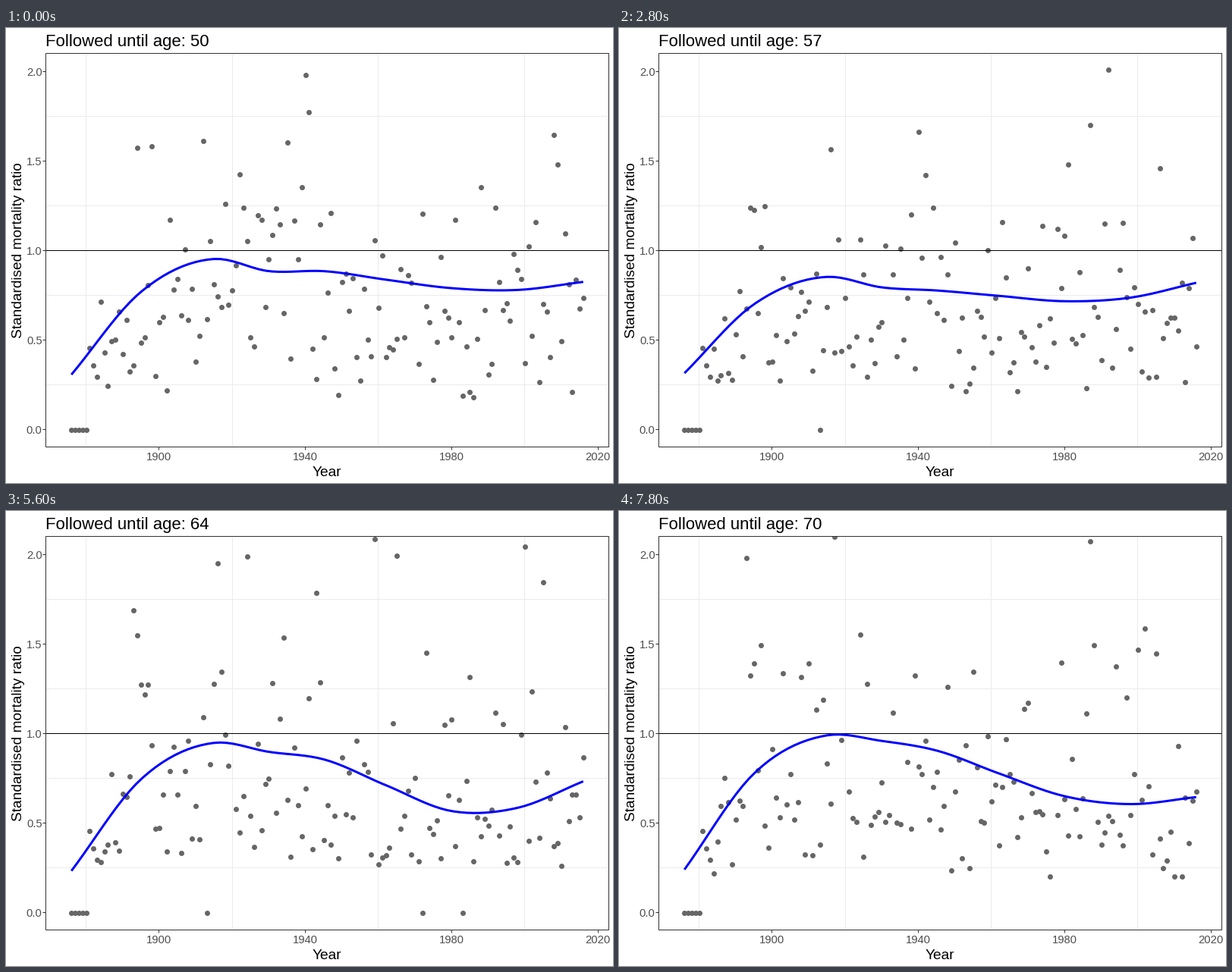
Recreate the animation shown at these times as a matplotlib script. Size 800 by 600 pixels, loop 8 s.

```python
import numpy as np
import matplotlib.pyplot as plt
from matplotlib.animation import FuncAnimation
from matplotlib.patches import Rectangle

W, H, DPI = 800, 600, 100
FRAMES, STEP_MS = 40, 200
PX = 72 / DPI  # points per pixel
LEFT, TOP, RIGHT, BOTTOM = 52.5, 33.5, 794.5, 552.5
YEARS = np.arange(1876, 2017)
CURVE_X = np.linspace(1876, 2016, 80)

plt.rcParams["font.family"] = "Liberation Sans"

# Key heights of the trend: moment in the loop, then years
# 1876, 1915 (peak), 1945, 1980, 1998 and 2016
KEYS = np.array([
    (0, .307, .953, .885, .79, .78, .825),
    (14, .315, .853, .777, .717, .737, .82),
    (22, .237, .90, .83, .63, .725, 1.0),
    (28, .233, .948, .856, .567, .585, .733),
    (34, .262, .997, .913, .60, .565, .635),
    (39, .24, .99, .905, .65, .606, .645),
])


def px_x(year):
    return LEFT + (np.asarray(year) - 1869) * (RIGHT - LEFT) / 154


def px_y(ratio):
    return 529.5 - np.asarray(ratio) * 236


def pixel(v):
    """Centre of the pixel that holds v."""
    return np.floor(v) + .5


def hermite(x, xk, yk):
    """Smooth curve through the knots."""
    slope = np.gradient(yk, xk)
    k = np.clip(np.searchsorted(xk, x, "right") - 1, 0, len(xk) - 2)
    h = xk[k + 1] - xk[k]
    t = (x - xk[k]) / h
    return ((1 + 2 * t) * (1 - t) ** 2 * yk[k] + t * (1 - t) ** 2 * h * slope[k]
            + t * t * (3 - 2 * t) * yk[k + 1] + t * t * (t - 1) * h * slope[k + 1])


def trend(i, x):
    start, peak, mid, low, late, end = (
        np.interp(i, KEYS[:, 0], col) for col in KEYS[:, 1:].T)
    rise = start + .715 * (peak - start)
    shoulder = mid + .65 * i / FRAMES * (peak - mid)
    knots = np.array([1876, 1895, 1915, 1930, 1945, 1962, 1980, 1998, 2016])
    heights = np.array([start, rise, peak, shoulder, mid, (mid + low) / 2,
                        low, late, end])
    return hermite(x, knots, heights)


def simulate(count):
    """Ratios per age: whole numbers of deaths over expected deaths."""
    rng = np.random.default_rng(7)
    n = len(YEARS)
    early = YEARS < 1884
    keep = np.where(YEARS < 1915, .95, .8)
    base = rng.uniform(2.4, 4.6, n)
    z = rng.normal(size=n)
    states = []
    for k in range(count):
        risk = trend(2 * k, YEARS) * np.exp(.52 * z - .13)
        growth = 1.1 + .25 * np.cos(2 * np.pi * k / 26)
        expected = np.where(early, 2.2 + .6 * abs(YEARS - 1881), base * growth)
        deaths = np.where(early, YEARS > 1880, np.rint(risk * expected))
        states.append(deaths / expected)
        z = keep * z + np.sqrt(1 - keep ** 2) * rng.normal(size=n)
    return states


STATES = simulate(FRAMES // 2 + 1)

fig = plt.figure(figsize=(W / DPI, H / DPI), dpi=DPI, facecolor="white")
ax = fig.add_axes([0, 0, 1, 1])
ax.set_xlim(0, W)
ax.set_ylim(H, 0)
ax.axis("off")


def hline(y, x0, x1, color, z):
    ax.plot([x0, x1], [pixel(y)] * 2, color=color, lw=PX, zorder=z,
            solid_capstyle="butt", snap=False)


def vline(x, y0, y1, color, z):
    ax.plot([pixel(x)] * 2, [y0, y1], color=color, lw=PX, zorder=z,
            solid_capstyle="butt", snap=False)


def label(x, y, text, size, color="black", ha="left", rotation=0):
    return ax.text(x, y, text, fontsize=size * PX, color=color, ha=ha,
                   va="baseline", rotation=rotation, rotation_mode="anchor")


for year in range(1880, 2021, 20):
    x = px_x(year)
    if year % 40:
        vline(x, BOTTOM, BOTTOM + 4, "#333333", 5)
        label(x, 570, str(year), 14.8, "#4d4d4d", "center")
for year in range(1880, 2001, 40):
    vline(px_x(year), TOP, BOTTOM, "#ebebeb", 1)
for ratio in np.arange(.25, 2, .5):
    hline(px_y(ratio), LEFT, RIGHT, "#ebebeb", 1)
for ratio in np.arange(0, 2.1, .5):
    hline(px_y(ratio), LEFT - 4, LEFT, "#333333", 5)
    label(47.5, px_y(ratio) + 5.5, f"{ratio:.1f}", 14.8, "#4d4d4d", "right")

hline(px_y(1), LEFT, RIGHT, "black", 3)
panel = Rectangle((LEFT, TOP), RIGHT - LEFT, BOTTOM - TOP, fill=False,
                  ec="#333333", lw=PX, zorder=5, snap=False)
ax.add_patch(panel)

label(423, 591, "Year", 19.2, ha="center")
label(21, 293, "Standardised mortality ratio", 19.2, ha="center", rotation=90)
title = label(52, 24, "", 22.2)

dots, = ax.plot([], [], "o", ms=7 * PX, mew=0, color="#666666", zorder=2)
curve, = ax.plot([], [], color="#0000ff", lw=3 * PX, zorder=4,
                 solid_capstyle="butt")
dots.set_clip_path(panel)


def draw(i):
    k, half = divmod(i, 2)
    ratios = (STATES[k] + STATES[k + half]) / 2
    dots.set_data(px_x(YEARS), px_y(ratios))
    curve.set_data(px_x(CURVE_X), px_y(trend(i, CURVE_X)))
    title.set_text(f"Followed until age: {round(50 + i * 50 / 99)}")
    return dots, curve, title


anim = FuncAnimation(fig, draw, frames=FRAMES, interval=STEP_MS,
                     repeat=True, repeat_delay=0, blit=False)
plt.show()
```
